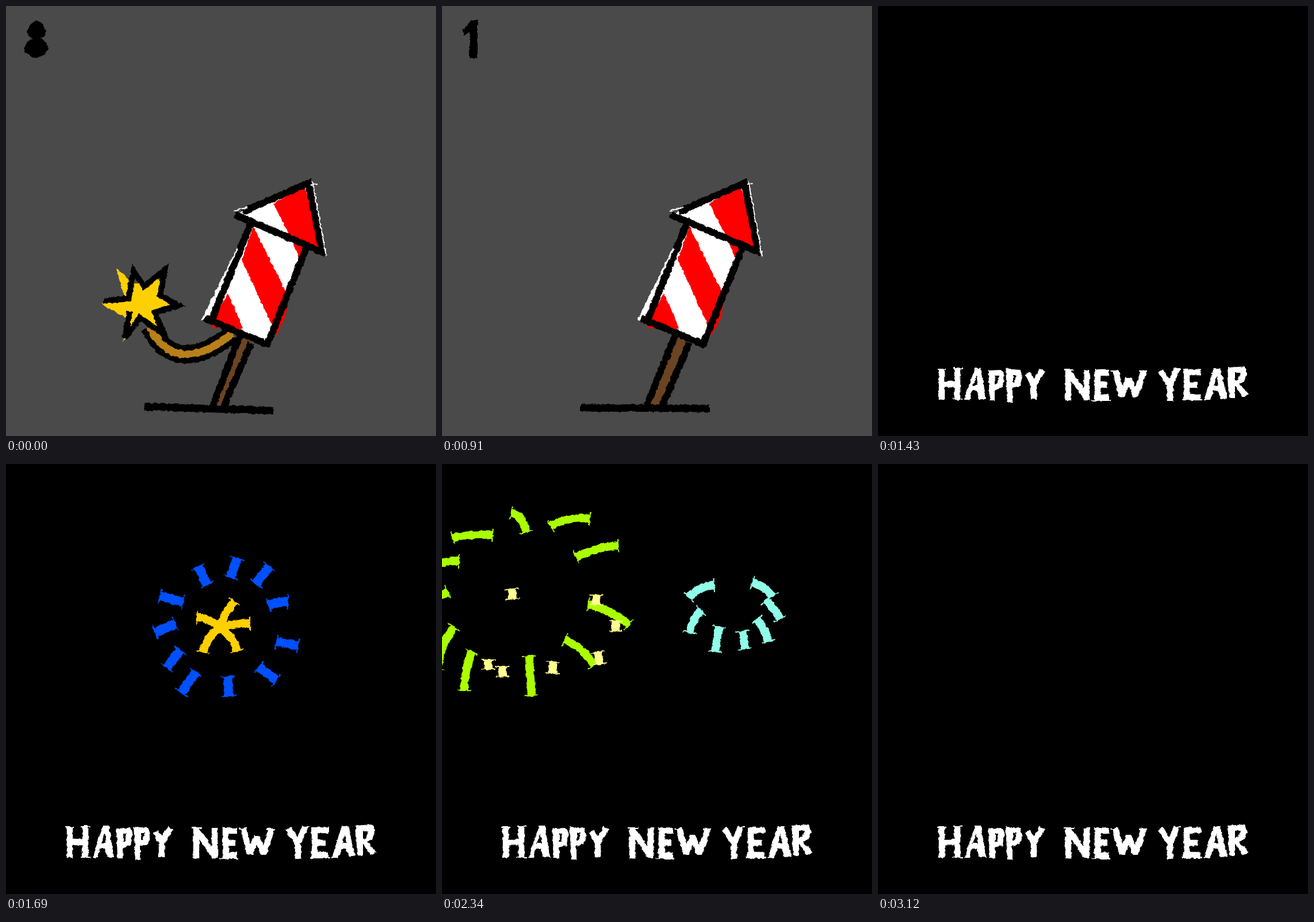
An HTML page that plays this animation: 748x748 px, repeating every 3250 ms.

```html
<!DOCTYPE html>
<html lang="en">
<head>
<meta charset="utf-8">
<title>Happy New Year</title>
<style>
  html, body { margin: 0; width: 100%; height: 100%; overflow: hidden; background: #4a4a4a; }
  svg { display: block; width: 100vw; height: 100vh; }
</style>
</head>
<body>
<svg viewBox="0 0 748 748" role="img" aria-label="Countdown, rocket, fireworks: HAPPY NEW YEAR">
  <filter id="rough" filterUnits="userSpaceOnUse" x="0" y="0" width="748" height="748" color-interpolation-filters="sRGB">
    <feTurbulence id="noise" type="fractalNoise" baseFrequency=".14" numOctaves="3" seed="1"/>
    <feDisplacementMap in="SourceGraphic" scale="5" xChannelSelector="R" yChannelSelector="G"/>
  </filter>
  <rect id="sky" width="748" height="748"/>
  <g id="art" filter="url(#rough)"></g>
</svg>
<script>
const STEP = 130, COUNT = 25, NIGHT = 11;
const $ = id => document.getElementById(id);
const fill = (d, c) => `<path d="${d}" fill="${c}"/>`;
const line = (d, w, c = '#000', extra = '') => `<path d="${d}" fill="none" stroke="${c}" stroke-width="${w}" ${extra}/>`;
const group = (x, y, s) => `<g transform="translate(${x} ${y})">${s}</g>`;

const RED = '#f00', WHITE = '#fff', GOLD = '#ffd000', GREY = '#4a4a4a';

// ---- countdown ----
const digits = [
  'M53 25Q76 28 74 57Q72 88 53 91Q32 88 32 57Q32 28 53 25Z',
  'M36 42L52 24H62V91H48V45L38 52Z',
  'M33 40Q38 24 54 24Q72 28 70 46L53 76H74V91H32L56 48L50 38L42 46Z',
  'M34 25H72L60 49Q76 58 70 78Q56 97 32 86L36 73L54 77L56 62L42 59L50 38H34Z',
  'M68 21V53L93 53L91 60L93 67L68 67V91H57V66H32V57Z',
  'M36 25H72V38H50V47Q74 50 72 70Q66 97 33 89V76L52 77L56 63L36 60Z',
  'M60 23L56 45Q76 52 73 72Q68 90 52 91Q30 88 33 64Q38 40 52 23Z',
  'M33 25H74L56 91H42L56 40H33Z',
  'M54 25Q66 29 70 44Q68 54 60 56Q73 62 73 74Q68 88 53 91Q34 87 32 73Q34 61 47 56Q37 52 37 43Q40 28 54 25Z'
];

// ---- rocket ----
const body =
  fill('M427 378L523 418L452 586L342 546Z', WHITE) +
  fill('M430 383L487 497L463 556L410 442Z', RED) +
  fill('M386 500L413 562L358 560L360 545Z', RED) +
  fill('M496 405L526 420L511 441Z', RED) +
  fill('M491 510L486 540L469 574L464 560Z', RED) +
  line('M426 377L357 548', 12) + line('M346 543L458 590', 12) + line('M523 420L453 592', 12) +
  line('M403 421L341 547', 3, WHITE) +
  fill('M402 361L522 310L552 430Z', WHITE) +
  fill('M465 343L520 315L551 428L495 403Z', RED) +
  line('M412 358L526 308L550 428', 12) + line('M398 363L555 430', 12) +
  line('M396 357L420 350M533 305L557 435M530 311L541 309', 2, WHITE);

const fusePath = 'M250 558Q274 606 312 606Q350 606 393 570';
const burn = [0, .18, .34, .5, .72, .88];
const sparkAt = [[235, 517], [256, 560], [282, 590], [308, 605], [338, 601], [363, 588], [388, 574]];

const sparkA =
  fill('M-43 -60L-13 -36L5 -32L33 -57L30 -15L50 2L20 15L35 44L0 25L-31 67L-27 25L-68 2L-30 -12Z', GOLD) +
  line('M-65 -4L-22 -8L-13 -56L5 -29L41 -58L33 -14L65 4L24 16L40 54L-2 25L-28 60L-20 14', 10);
const sparkB =
  line('M0 -42L11 -19L48 -26L26 6L40 46L7 24L-23 52L-20 17L-54 0L-18 -9', 16) +
  fill('M-28 -53L-12 -52L-11 -20L7 -13L56 -22L22 7L43 52L6 24L-26 65L-17 16L-60 -3L-22 -9Z', GOLD);

const fuse = n => {
  const dash = `pathLength="1" stroke-dasharray="1 2" stroke-dashoffset="${-burn[n]}"`;
  return line(fusePath, n < 4 ? 32 : 18, '#000', dash) + line(fusePath, n < 4 ? 13 : 4, '#b8801a', dash);
};
// the stick outline wobbles between a tight and a wide pose
const stand = n => {
  const wide = n % 3 === 1 ? 4 : 0;
  return fill('M408 573L429 577L380 695L358 692Z', '#6b4423') +
    line(`M${409 - wide / 4} 567L${360 - wide} 695`, 12) +
    line(`M${426 + wide} 586L${379 + wide} 696`, 12) +
    line(`M241 ${n ? 699 : 697}L${n === 10 ? 480 : 465} ${n ? 700 : 704}`, 13);
};
const flame = k =>
  fill(`M360 560L440 592L${400 - 30 * k} ${600 + 70 * k}L${388 - 12 * k} ${600 + 25 * k}L${350 - 20 * k} ${600 + 40 * k}Z`, GOLD) +
  fill(`M375 565L425 588L${385 - 12 * k} ${600 + 35 * k}Z`, '#ff8800');

const flight = { 8: [34, -77, 1], 9: [180, -408, 1.7] };

function launch(n) {
  let s = stand(n);
  if (n < 9) s += fill(digits[8 - n], '#000');
  if (n < 6) s += fuse(n);
  if (flight[n]) {
    const [x, y, k] = flight[n];
    s += group(x, y, flame(k) + body);
  } else if (n < 8) s += body;
  if (sparkAt[n]) s += group(...sparkAt[n], n % 3 === 1 ? sparkB : sparkA);
  return s;
}

// ---- lettering ----
const strokes = [
  'M111 632V685M138 630V684M111 658H138',
  'M331 633V686M363 633V686M331 636L363 682',
  'M382 632V686M377 638H402M382 659H399M377 681H402',
  'M413 633L424 678L436 648L448 678L462 635',
  'M537 632V685M531 637H562M537 659H556M531 680H561',
  'M260 639L271 659L286 633M271 655V684',
  'M491 634L508 660L520 631M508 655V687'
].join('');
const solid =
  'M169 629H179L188 684H176L172 669H163L160 685H150Z' +
  'M192 634L216 633L220 641L217 663L204 667V686H194Z' +
  'M222 631L247 633L251 645L247 661L234 664V689H225Z' +
  'M584 630H595L608 682L596 684L591 669H584L578 685H567Z' +
  'M608 629L638 627L642 641L638 653L628 657L645 675L635 681L621 660V681H611Z';
const holes = 'M171 643L174 660H165ZM204 643H210L207 657H204ZM235 642H241L238 655H235ZM589 643L592 660H585ZM621 638H630L627 649L621 651Z';
const greeting = line(strokes, 10.5, WHITE, 'stroke-miterlimit="2"') + fill(solid, WHITE) + fill(holes, '#000') +
  line('M104 632H118M131 630H148M130 684H148M323 633H341M371 686H404M405 635H419M453 635H468M516 632H527M529 685H564', 2, WHITE);

// ---- fireworks: bars are "start end" or "start control end" ----
const layers = [
  { color: '#0050ff', w: 16, c: [383, 284], at: { 12: [.45, 0], 13: [1, 0], 14: [1.35, 6] },
    bars: '334,179 350,210|402,164 391,197|458,178 435,208|457,246 472,240 490,240|471,309 508,316|440,353 470,376|386,370 388,403|330,362 305,398|303,324 280,354|294,278 260,293|308,240 268,230' },
  { color: GOLD, w: 14, c: [372, 284], at: { 12: [.5, 0], 13: [1, 0], 14: [1.6, 4] },
    bars: '372,284 380,260 397,239|372,284 352,268 332,266|372,284 350,300 343,327|372,284 395,300 402,325|372,284 395,277 424,277' },
  { color: '#ff00ee', w: 14, c: [148, 165], at: { 14: [.4, 0], 15: [.7, 0], 16: [1, 0], 17: [1.2, 18] },
    bars: '42,162 85,80 140,168|148,147 185,72 210,125|158,153 238,128 243,183|140,177 78,160 86,248|162,175 205,172 202,242' },
  { color: '#aaff00', w: 14, c: [140, 170], at: { 15: [.65, -8], 16: [1, 0], 17: [1.2, 24], 18: [1.3, 55] },
    bars: '125,62 140,65 145,88|178,80 200,67 230,70|47,96 70,90 100,92|212,121 240,108 268,106|0,152 20,125 55,127|0,195 15,180 40,168|26,272 28,245 48,215|62,300 63,270 72,248|149,254 152,307|197,232 220,242 236,266|228,185 255,190 282,212' },
  { color: '#ff8800', w: 13, c: [383, 290], at: { 15: [.75, -12], 16: [1, 0], 17: [1.1, 30] },
    bars: '299,252 270,290 262,347|320,318 306,350 306,405|465,252 488,290 480,345|488,312 500,335 502,375|435,330 448,360 450,405' },
  { color: '#00d8ff', w: 14, c: [390, 290], at: { 15: [.82, -15], 16: [1, 0], 17: [1.1, 28] },
    bars: '322,180 304,232|376,182 364,245|247,248 233,290|258,282 238,328|264,343 257,396|294,388 294,456|390,397 389,455|464,368 475,400 482,440|521,322 537,395|533,248 542,270 557,303|502,190 520,210 530,240' },
  { color: WHITE, w: 13, c: [505, 238], at: { 16: [1, 0], 17: [2.6, 0] },
    bars: '505,230 506,247|493,241 517,238' },
  { color: '#90ffe8', w: 14, c: [510, 245], at: { 18: [.4, 0], 19: [.72, -6], 20: [1, 0], 21: [1.15, 22] },
    bars: '418,160 350,165 310,212|362,270 325,305 312,365|440,340 430,395 423,448|543,360 552,436|605,308 640,350 655,403|643,225 680,260 705,305|585,148 650,170 670,208' },
  { color: '#ffc820', w: 15, c: [510, 250], at: { 19: [.7, -8], 20: [1, 0], 21: [1.13, 22], 22: [1.22, 50] },
    bars: '296,62 330,64|575,70 598,57 622,52|255,188 303,162|299,314 280,335 271,362|356,408 338,450|510,433 522,460 530,489|605,413 640,466|683,345 730,388|718,250 748,268|708,158 730,155 748,172' },
  { color: '#ffff90', w: 14, c: [190, 310], at: { 18: [.7, -30], 19: [.87, -14], 20: [1, 0], 21: [1.08, 18], 22: [1.12, 40] },
    bars: '92,221 94,245|302,236 302,259|350,300 350,325|306,378 311,407|34,397 34,420|69,413 69,438|195,402 193,430' }
];

function bar(a, m, b, w, color) {
  // thin overshooting cuts across both ends
  const tick = ([x, y], [p, q]) => {
    const d = Math.hypot(x - p, y - q) || 1, r = w / 2 + 5;
    const u = (q - y) / d * r, v = (x - p) / d * r;
    return `M${x - u} ${y - v}L${x + u} ${y + v}`;
  };
  return line(`M${a}Q${m} ${b}`, w, color) + line(tick(a, m) + tick(b, m), 2, color);
}

function burst({ color, w, c, at, bars }, n) {
  if (!at[n]) return '';
  const [scale, drop] = at[n];
  const place = p => p.split(',').map((v, i) => c[i] + (v - c[i]) * scale + i * drop);
  return bars.split('|').map(s => {
    const pts = s.split(' ').map(place), a = pts[0], b = pts[pts.length - 1];
    const m = pts[2] ? pts[1] : [(a[0] + b[0]) / 2, (a[1] + b[1]) / 2];
    return bar(a, m, b, w, color);
  }).join('');
}

const night = n => layers.map(l => burst(l, n)).join('') + greeting;

// ---- playback ----
const start = performance.now();
let shown = -1;
function draw() {
  const n = Math.floor(Math.max(0, performance.now() - start) / STEP) % COUNT;
  if (n !== shown) {
    shown = n;
    $('sky').setAttribute('fill', n < NIGHT ? GREY : '#000');
    $('noise').setAttribute('seed', 2 + n % 3);
    $('art').innerHTML = n < NIGHT ? launch(n) : night(n);
  }
  requestAnimationFrame(draw);
}
draw();
</script>
</body>
</html>
```
